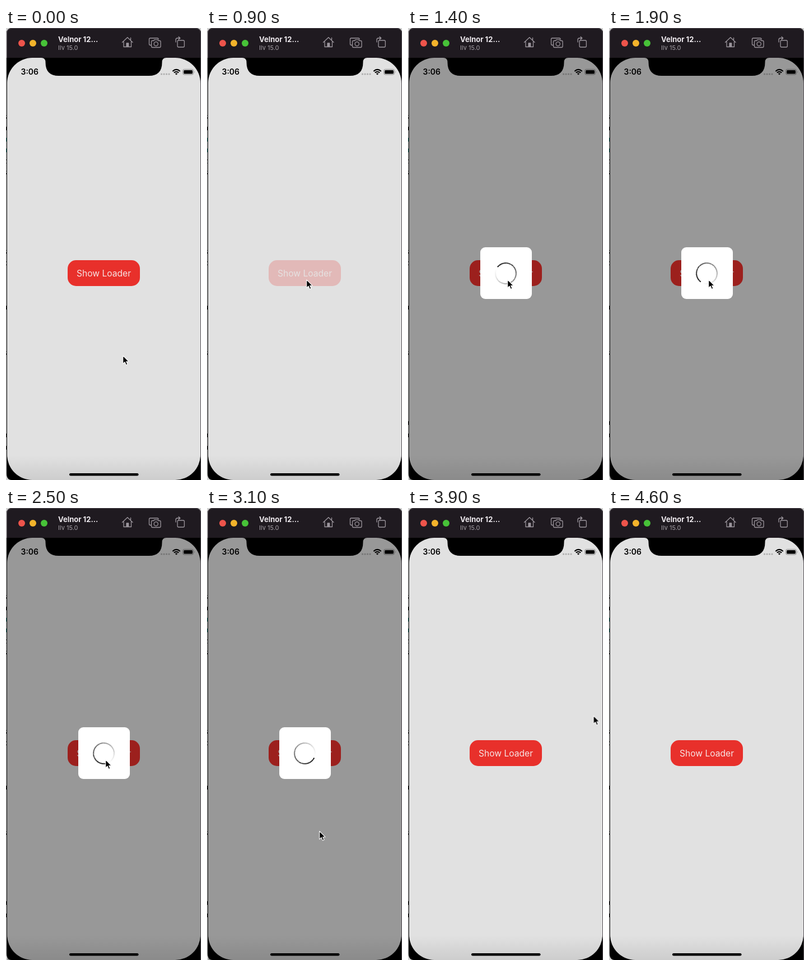
Animation of 348x804 px, one loop 4.7 s. Source, as an HTML page:

```html
<!DOCTYPE html>
<html lang="en">
<head>
<meta charset="utf-8">
<title>Loader demo</title>
<style>
html, body { margin: 0; width: 100%; height: 100%; overflow: hidden; background: #000; }
.stage { position: absolute; inset: 0 auto auto 0; width: 348px; height: 804px; overflow: hidden; }
.stage svg { position: absolute; left: 0; top: 0; }
text { font-family: Inter, "Liberation Sans", sans-serif; }
.code text { font: 13px "Noto Sans Mono", monospace; fill: #222; }
.code .teal { fill: #1d7a72; }
.icons { fill: none; stroke: #9b959c; stroke-width: 1.3; stroke-linejoin: round; stroke-linecap: round; }

.lines, .button, .modal, .ring, .cursor { animation: 4700ms step-end infinite; }
.lines { animation-name: scroll; }
.button { animation-name: press; }
.modal { animation-name: show; position: absolute; left: 2px; top: 53px; width: 345px; height: 751px; background: rgba(0, 0, 0, .324); }
.card { position: absolute; left: 126.5px; top: 337px; width: 92px; height: 92px; border-radius: 9px; background: #fff; }
.ring {
  animation-name: spin;
  position: absolute; left: 26.5px; top: 26.5px; width: 39px; height: 39px; border-radius: 50%;
  background: conic-gradient(from 90deg, #000, #222 60deg, #666 150deg, #aaa 235deg, #e4e4e4 300deg, #fff 345deg);
  -webkit-mask: radial-gradient(circle, transparent 17.2px, #000 17.8px);
  mask: radial-gradient(circle, transparent 17.2px, #000 17.8px);
}
.cursor { animation-name: move; }

@keyframes scroll { 0% { transform: none; } 21.27%, 100% { transform: translateY(-22px); } }
@keyframes press {
  0% { opacity: 1; }
  19.14% { opacity: .22; }
  21.27% { opacity: .28; animation-timing-function: steps(3); }
  27.65%, 100% { opacity: 1; }
}
@keyframes show {
  0% { visibility: hidden; }
  21.27% { visibility: visible; }
  68.08%, 100% { visibility: hidden; }
}
@keyframes spin {
  0% { transform: rotate(5deg); }
  21.27% { transform: rotate(5deg); animation-timing-function: steps(9); }
  40.42% { transform: rotate(487deg); animation-timing-function: steps(12); }
  65.95%, 100% { transform: rotate(1107deg); }
}
@keyframes move {
  0% { transform: translate(208px, 582px); }
  2.12% { transform: translate(197px, 546px); }
  4.25% { transform: translate(197px, 546px); animation-timing-function: steps(5); }
  14.89% { transform: translate(177px, 447px); }
  55.31% { transform: translate(177px, 447px); animation-timing-function: steps(4); }
  63.82% { transform: translate(200px, 574px); }
  68.08% { transform: translate(200px, 574px); animation-timing-function: steps(6); }
  80.84% { transform: translate(326px, 440px); animation-timing-function: steps(6); }
  93.61%, 100% { transform: translate(352px, 12px); }
}
</style>
</head>
<body>
<div class="stage">
  <svg width="348" height="804" viewBox="0 0 348 804">
    <defs>
      <linearGradient id="shade" x1="0" y1="0" x2="0" y2="1">
        <stop offset="0" stop-opacity="0"/>
        <stop offset="1" stop-opacity=".09"/>
      </linearGradient>
      <clipPath id="screen"><rect x="2" y="53" width="345" height="751" rx="45"/></clipPath>
    </defs>

    <rect width="348" height="804" fill="#d6d6d6"/>
    <g class="code">
      <text x="-5.5" y="162">s</text>
      <text x="-5.5" y="182">a</text>
      <text x="-5.5" y="202" class="teal">n</text>
      <text x="-5.5" y="221" class="teal">n</text>
      <text x="-5.5" y="241">r</text>
      <text x="-5.5" y="261">s</text>
      <text x="-5.5" y="402">s</text>
      <text x="-5.5" y="422">c</text>
      <text x="-5.5" y="501">u</text>
      <text x="-5.5" y="582">s</text>
      <g class="lines">
        <text x="-5.5" y="728">n</text>
        <text x="-5.5" y="750">n</text>
      </g>
    </g>

    <path d="M1 10Q1 0 11 0H338Q348 0 348 10V804H10Q1 804 1 792Z"/>
    <path d="M1 53V10Q1 0 11 0H338Q348 0 348 10V53Z" fill="#1f1a20"/>
    <path d="M1.5 53V10Q1.5 .5 11 .5H338Q347.5 .5 347.5 10V804" fill="none" stroke="#555056"/>

    <circle cx="28" cy="27" r="6" fill="#ee544b"/>
    <circle cx="48" cy="27" r="6" fill="#f3b32b"/>
    <circle cx="68" cy="27" r="6" fill="#47c238"/>
    <text x="93" y="25" font-size="13" font-weight="700" fill="#efebef">Velnor 12...</text>
    <text x="93" y="39" font-size="11" fill="#a49fa5">Ilv 15.0</text>

    <g class="icons">
      <path d="M207.5 25.5L216.8 16.8L226 25.5M210 24V33.5H223.5V24M222.5 21.5V17.5"/>
      <path d="M215 33V27H218.7V33Z" fill="#9b959c"/>
      <path d="M258.5 30.5H257.5Q255.5 30.5 255.5 28.5V20Q255.5 18 257.5 18H270Q272 18 272 20"/>
      <path d="M261 22.5H263.5L265 20.8H270.5L272 22.5H274Q276 22.5 276 24.5V32.5Q276 34.5 274 34.5H261.500Q259.500 34.5 259.500 32.500V24.500Q259.500 22.500 261 22.500Z"/>
      <circle cx="267.7" cy="28.3" r="3.6"/>
      <rect x="306" y="22" width="12.300" height="12" rx="2"/>
      <path d="M303 25V21Q303 18 306 18H310.500M308 15.500L310.800 18L308 20.500"/>
    </g>

    <g clip-path="url(#screen)">
      <rect x="2" y="53" width="345" height="751" fill="#e1e1e1"/>
      <rect x="2" y="760" width="345" height="44" fill="url(#shade)"/>
    </g>
    <path d="M63 53Q70.500 53 70.500 61Q70.500 85 94 85H255Q278.500 85 278.500 61Q278.500 53 286 53Z"/>

    <text x="26.500" y="83" font-size="14" font-weight="600">3:06</text>
    <g fill="#adadad">
      <circle cx="277.500" cy="82" r="1.600"/>
      <circle cx="282" cy="82" r="1.600"/>
      <circle cx="286.500" cy="82" r="1.600"/>
      <circle cx="291" cy="82" r="1.600"/>
    </g>
    <g fill="none" stroke="#000" stroke-width="2">
      <path d="M297.300 77Q304 70.800 310.700 77M299.800 79.600Q304 75.800 308.200 79.600"/>
    </g>
    <path d="M301.800 81.200Q304 79.400 306.200 81.200L304 83.500Z"/>
    <rect x="315.500" y="73.500" width="19" height="9.500" rx="2.800" fill="none" stroke="#8c8c8c"/>
    <rect x="317" y="75" width="16" height="6.500" rx="1.500"/>
    <path d="M335.800 76.500Q337.500 78.200 335.800 80Z" fill="#8c8c8c"/>

    <g class="button">
      <rect x="110" y="413" width="129" height="46" rx="15" fill="#e8302b"/>
      <text x="174.500" y="442" font-size="15.600" text-anchor="middle" fill="#f6e4e4">Show Loader</text>
    </g>
    <rect x="113" y="792" width="123.500" height="4.500" rx="2.250"/>
  </svg>

  <div class="modal"><div class="card"><div class="ring"></div></div></div>

  <svg width="348" height="804" viewBox="0 0 348 804">
    <g class="cursor">
      <path d="M.7 .8V15.200L4.100 12.100L6.400 17.400L8.900 16.300L6.700 11.200H11Z" stroke="#fff" stroke-width="1.100" stroke-linejoin="round"/>
    </g>
  </svg>
</div>
</body>
</html>
```
